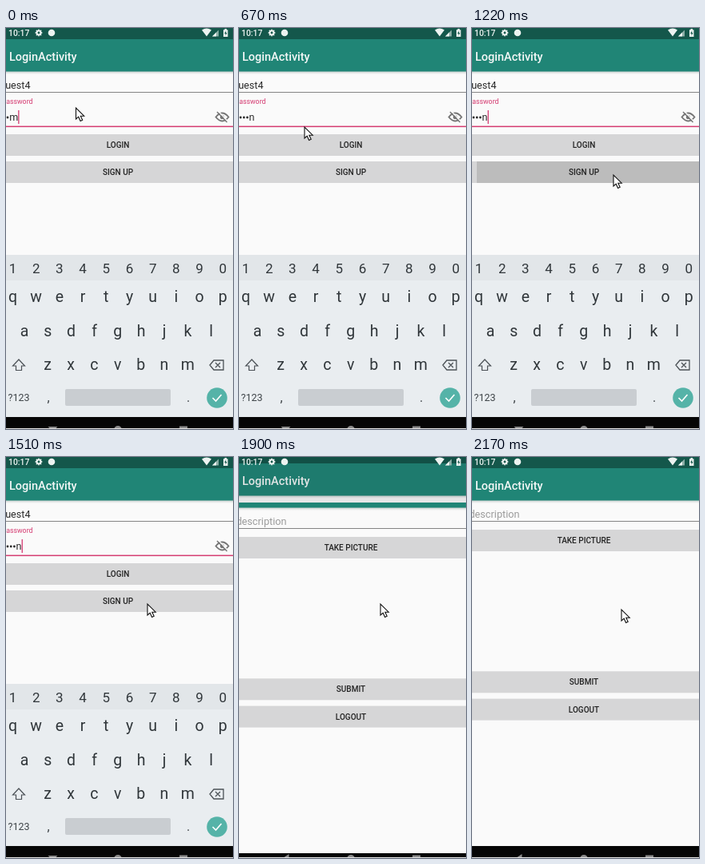
An HTML page with a canvas for the animation above (2.27 s loop, 284 by 502 pixels).

```html
<!DOCTYPE html>
<html lang="en">
<head>
<meta charset="utf-8">
<title>Login screen</title>
<style>
html, body { margin: 0; width: 100%; height: 100%; overflow: hidden; background: #000; }
canvas { display: block; width: 284px; height: 502px; }
</style>
</head>
<body>
<canvas id="stage" width="284" height="502"></canvas>
<script>
const ctx = document.getElementById('stage').getContext('2d');
const W = 284, H = 502, LOOP = 2270;
const INK = '#2b2b2b', PINK = '#d43a70', TEAL = '#208576', DARK_TEAL = '#14574b';

// Each step: start time followed by the values held until the next step.
const POINTER = [[0, 87.5, 100], [670, 82, 124], [800, 165, 194], [940, 171, 188], [1060, 177, 184], [2170, 187, 191]];
const PASSWORD = [[0, 1, 'm', true], [120, 2, 'm', true], [250, 3, 'n', true],
  [670, 3, 'n', false], [1220, 3, 'n', true], [1780, 4, '', false]];
const RIPPLE = [[0, W, ''], [1220, 6, '#bcbcbc'], [1350, 0, '#c4c4c4'], [1510, W, '']];
// Start, old screen shift, dimming, new screen shift, top of the revealed area.
const SLIDE = [[0, 0, 0, 0, H], [1780, 0, 0.03, 0, H], [1900, -6, 0.08, 9, 57], [2030, -8, 0.1, 2, 6], [2170, 0, 0, 0, 0]];

const at = (steps, t) => steps.filter(s => s[0] <= t).pop().slice(1);

function rect(x, y, w, h, color) {
  ctx.fillStyle = color;
  ctx.fillRect(x, y, w, h);
}

function dot(x, y, r, color) {
  ctx.fillStyle = color;
  ctx.beginPath();
  ctx.arc(x, y, r, 0, Math.PI * 2);
  ctx.fill();
}

function text(str, x, y, size, color, align = 'left', weight = 400) {
  ctx.font = `${weight} ${size}px Roboto, sans-serif`;
  ctx.textAlign = align;
  ctx.fillStyle = color;
  ctx.fillText(str, x, y);
}

function fillPath(d, x, y, color) {
  ctx.save();
  ctx.translate(x, y);
  ctx.fillStyle = color;
  ctx.fill(new Path2D(d));
  ctx.restore();
}

function strokePath(d, x, y, color, width) {
  ctx.save();
  ctx.translate(x, y);
  ctx.strokeStyle = color;
  ctx.lineWidth = width;
  ctx.stroke(new Path2D(d));
  ctx.restore();
}

function shifted(dy, draw) {
  ctx.save();
  ctx.translate(0, dy);
  draw();
  ctx.restore();
}

function button(label, y, ripple) {
  rect(0, y, W, 27, '#d6d6d7');
  if (ripple && ripple[1]) rect(ripple[0], y, W, 27, ripple[1]);
  text(label, 140, y + 17, 10, '#222', 'center', 500);
}

function appFrame() {
  rect(0, 0, W, H + 20, '#fafafa');
  const shade = ctx.createLinearGradient(0, 54, 0, 58);
  shade.addColorStop(0, '#c9cfce');
  shade.addColorStop(1, '#fafafa');
  rect(0, 54, W, 4, shade);
  rect(0, 14, W, 40.5, TEAL);
  rect(0, -20, W, 34, DARK_TEAL);
  text('LoginActivity', 4, 40.5, 14.5, '#f4f8f7', 'left', 500);
}

function eyeOff(x, y) {
  strokePath('M-8 0Q0 -10 8 0Q0 10 -8 0Z', x, y, '#747474', 1.8);
  dot(x, y, 2.6, '#747474');
  strokePath('M-5 -7.5L7 5.5', x, y, '#fafafa', 1.4);
  strokePath('M-6.5 -6.5L6 6.5', x, y, '#747474', 1.4);
}

function loginScreen(t) {
  const [dots, letter, caret] = at(PASSWORD, t);
  appFrame();
  text('guest4', 30.5, 75.5, 12.6, INK, 'right');
  rect(0, 80, W, 1, '#858585');
  text('password', 33.5, 95, 8.8, PINK, 'right');
  for (let i = 0; i < dots; i++) dot(2 + 4.2 * i, 112, 1.4, INK);
  text(letter, 4.2 * dots, 116.3, 12.6, INK);
  if (caret) rect(4.2 * dots + (letter === 'm' ? 11 : 7), 103, 1.3, 17, PINK);
  rect(0, 122.6, W, 1.5, PINK);
  eyeOff(270.5, 111.5);
  button('LOGIN', 133);
  button('SIGN UP', 167, at(RIPPLE, t));
}

function postScreen() {
  appFrame();
  text('description', 59.5, 75.5, 12.7, '#9b9b9b', 'right');
  rect(0, 80, W, 1, '#858585');
  button('TAKE PICTURE', 91);
  button('SUBMIT', 268.3);
  button('LOGOUT', 302.6);
}

function keyRow(keys, x, y, size) {
  [...keys].forEach((key, i) => text(key, x + 29.2 * i, y, size, '#30363a', 'center'));
}

function keyboard() {
  rect(0, 284, W, 210, '#e9edf0');
  rect(0, 284, W, 32, '#e2e6e9');
  keyRow('1234567890', 8.5, 307, 17);
  keyRow('qwertyuiop', 8.5, 343, 19.5);
  keyRow('asdfghjkl', 23, 385.5, 19.5);
  keyRow('zxcvbnm', 52, 428, 19.5);
  strokePath('M0 -7L7.5 1H3.5V6.5H-3.5V1H-7.5Z', 16, 422, '#4b5156', 1.2);
  strokePath('M-9 0L-4 -6H8V6H-4ZM-2 -3L4 3M4 -3L-2 3', 264, 422, '#4b5156', 1.3);
  text('?123', 16, 467, 12.5, '#3d4347', 'center');
  text(',', 53, 468, 16, '#3d4347', 'center');
  text('.', 228, 468, 16, '#3d4347', 'center');
  ctx.fillStyle = '#c9cdd1';
  ctx.beginPath();
  ctx.roundRect(74, 452, 132, 21, 2);
  ctx.fill();
  dot(264, 463, 12.8, '#55b3a8');
  strokePath('M-5.5 0L-1.5 4L5.5 -4', 264, 463, '#fff', 1.6);
}

function statusIcons() {
  const pale = '#edf3f1';
  text('10:17', 3, 10, 10.4, pale, 'left', 500);
  dot(41, 6, 3.4, pale);
  for (let i = 0; i < 8; i++) {
    const a = i * Math.PI / 4;
    dot(41 + 3.6 * Math.cos(a), 6 + 3.6 * Math.sin(a), 0.9, pale);
  }
  dot(41, 6, 1.4, DARK_TEAL);
  dot(57, 6, 4.3, pale);
  fillPath('M-6 -3Q0 -7 6 -3L0 5Z', 251, 5.5, pale);
  fillPath('M0 9L8 1V9Z', 258, 1.5, '#8eb0a9');
  fillPath('M0 9L5 4V9Z', 258, 1.5, pale);
  fillPath('M0 1.2H1.5V0H4V1.2H5.5V10H0Z', 272, 1, pale);
  fillPath('M3.2 2.5L1.2 6H2.6V8.5L4.5 5H3.2Z', 272, 1, DARK_TEAL);
}

function navBar(top, typing) {
  const gray = '#8b8b8b';
  rect(0, top, W, H - top, '#060606');
  fillPath(typing ? 'M-6 0H6L0 6Z' : 'M-5 5L4 -1V11Z', 58.5, typing ? 499 : 498, gray);
  dot(140, 503, 5, gray);
  rect(217, 498.5, 10, 4, gray);
  rect(0, 501, W, 1, '#e4e4e4');
}

function pointer(x, y) {
  const d = 'M0 0V14L3.2 11.2L5.6 16.5L8.2 15.3L5.8 10.2H10.2Z';
  fillPath(d, x, y, '#fff');
  strokePath(d, x, y, '#111', 1.1);
}

function draw(t) {
  const [oldShift, dim, newShift, top] = at(SLIDE, t);
  const typing = t < 1780, leaving = t < 1900;
  shifted(oldShift, () => loginScreen(t));
  rect(0, 0, W, H, `rgba(0, 10, 20, ${dim})`);
  if (leaving) {
    shifted(typing ? 0 : 1, keyboard);
  } else {
    ctx.save();
    ctx.beginPath();
    ctx.rect(0, top, W, H - top);
    ctx.clip();
    shifted(newShift, postScreen);
    ctx.restore();
  }
  navBar(487 + newShift, typing);
  statusIcons();
  pointer(...at(POINTER, t));
}

function tick(now) {
  draw(now % LOOP);
  requestAnimationFrame(tick);
}

draw(0);
requestAnimationFrame(tick);
</script>
</body>
</html>
```
